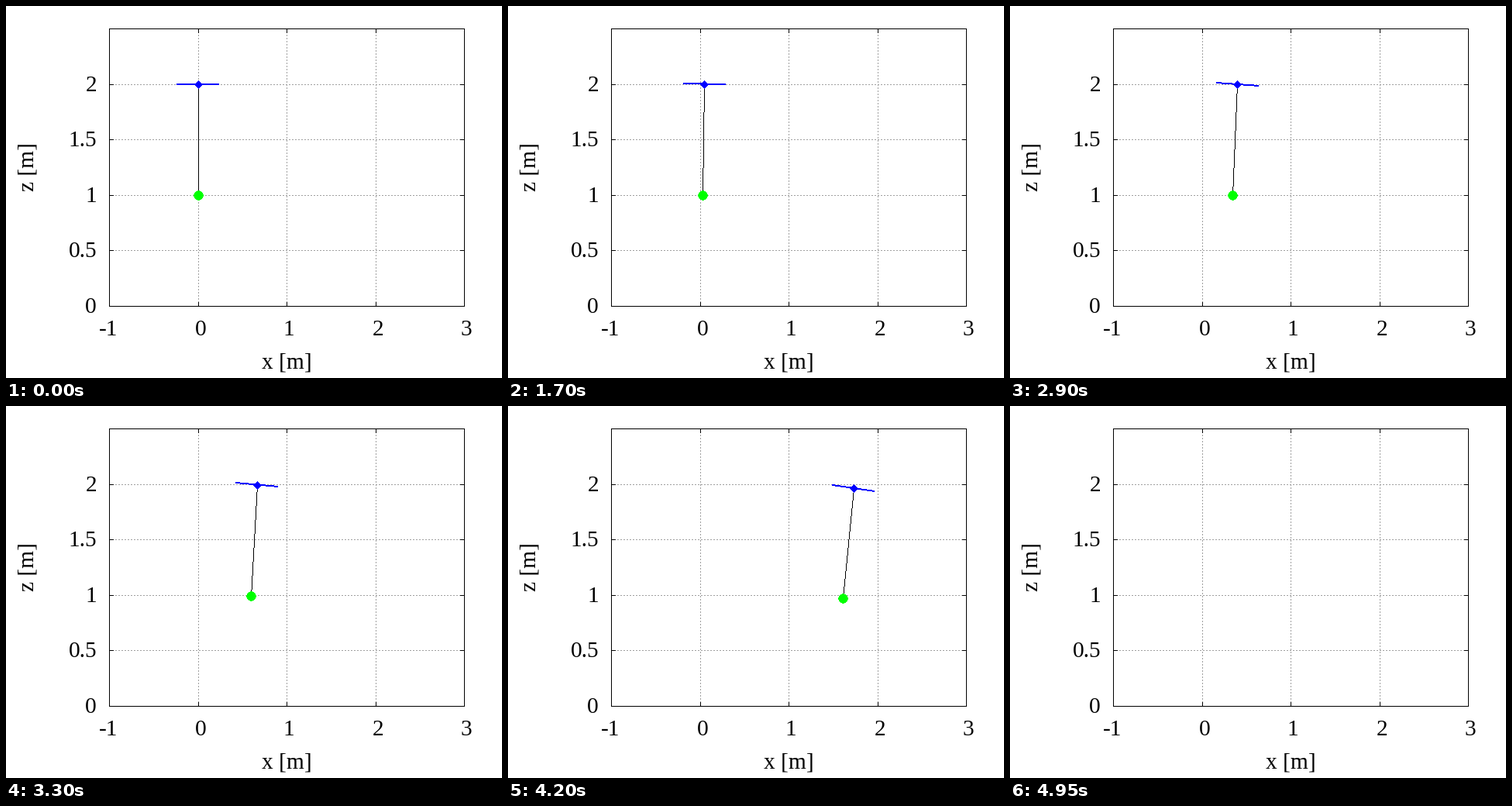
Recreate the animation shown at these times as a matplotlib script. Size 640 px wide and 480 px high, loop 7050 ms.

```python
import math

import matplotlib.pyplot as plt
from matplotlib.animation import FuncAnimation
from matplotlib.patches import Circle, Polygon, Rectangle

W, H, DPI = 640, 480, 100
PX = 72 / DPI                           # one pixel in points
LEFT, RIGHT, TOP, BOTTOM = 133, 591, 29, 387
STEP, FRAMES = 50, 141

G, ROPE = 9.81, 1.0
TILT = 0.00669                          # drone tilt is TILT * t^2
SHARE = 0.25                            # load's share of the total mass
SWING = math.sqrt(G / ((1 - SHARE) * ROPE))
FALL = 6.66e-6
ARM = 0.24
FONT_PX = 22 * 96 / 72

plt.rcParams["font.family"] = "Liberation Serif"
plt.rcParams["path.simplify"] = False
fig = plt.figure(figsize=(W / DPI, H / DPI), dpi=DPI, facecolor="white")
ax = fig.add_axes([0, 0, 1, 1])
ax.set(xlim=(0, W), ylim=(H, 0))
ax.axis("off")


def to_px(x, z):
    """Map metres to whole pixels."""
    col = math.floor(LEFT + 0.5 + (x + 1) * (RIGHT - LEFT) / 4)
    row = H - 1 - math.floor(H - 1 - BOTTOM + 0.5 + z * (BOTTOM - TOP) / 2.5)
    return col, row


def line(xs, ys, color="black", width=1, **kw):
    item, = ax.plot(xs, ys, color=color, lw=width * PX,
                    solid_capstyle="butt", dash_capstyle="butt", **kw)
    item.set_snap(False)
    return item


def stairs(u0, v0, u1, v1):
    """Pixel steps of a line that runs mainly along u, one per unit of u."""
    us, vs = [], []
    for u in range(u0, u1):
        v = math.floor(v0 + (v1 - v0) * (u - u0) / (u1 - u0) + 0.5)
        us += [u, u + 1, math.nan]
        vs += [v, v, math.nan]
    return us, vs


def label(x, y, text, **kw):
    ax.text(x, y, text, size=FONT_PX * PX, va="baseline", **kw)


def draw_axes():
    grid = dict(color="#a0a0a0", zorder=1, linestyle=(0, (2, 2)))
    for x in range(-1, 4):
        col = to_px(x, 0)[0] + 0.5
        if -1 < x < 3:
            line([col, col], [TOP, BOTTOM + 1], **grid)
            line([col, col], [BOTTOM, BOTTOM - 5], zorder=6)
            line([col, col], [TOP, TOP + 6], zorder=6)
        if x < 0:
            label(120, 425, str(x))
        else:
            label(col + 2.5, 425, str(x), ha="center")
    for i in range(5):
        row = to_px(0, i / 2)[1] + 0.5
        if i:
            line([LEFT, RIGHT + 1], [row, row], **grid)
            line([LEFT, LEFT + 6], [row, row], zorder=6)
            line([RIGHT - 5, RIGHT + 1], [row, row], zorder=6)
        label(117, row + 8.5, f"{i / 2:g}", ha="right")
    for row in (TOP, BOTTOM):
        line([LEFT, RIGHT + 1], [row + 0.5] * 2, zorder=6)
    for col in (LEFT, RIGHT):
        line([col + 0.5] * 2, [TOP, BOTTOM + 1], zorder=6)
    label(362, 467, "x [m]", ha="center")
    label(35, 208, "z [m]", ha="center", rotation=90, rotation_mode="anchor")


draw_axes()
frame_box = Rectangle((LEFT, TOP), RIGHT - LEFT, BOTTOM - TOP,
                      transform=ax.transData)
rope = line([], [], zorder=2)
bar = line([], [], "#0000ff", 2, zorder=3)
for item in (rope, bar):
    item.set_clip_path(frame_box)

# Aliased fills cover every pixel they touch, so the radii are a bit small.
HUB_R, LOAD_R = 4.7, 5.6
hub = Polygon([(0, 0)] * 4, facecolor="#0000ff", edgecolor="none",
              antialiased=False, zorder=4)
load = Circle((0, 0), LOAD_R, facecolor="#00ff00", edgecolor="none",
              antialiased=False, zorder=4)
for patch in (hub, load):
    patch.set_snap(False)
    ax.add_patch(patch)


def pose(t):
    """Drone position, load position and drone tilt at t seconds."""
    tilt = TILT * t**2
    swing = TILT * (t**2 - 2 / SWING**2 * (1 - math.cos(SWING * t)))
    center = G * (TILT * t**4 / 12 - TILT**3 * t**8 / 336)
    x = center + SHARE * ROPE * math.sin(swing)
    z = 2 - FALL * t**6 - SHARE * ROPE * (1 - math.cos(swing))
    end = (x - ROPE * math.sin(swing), z - ROPE * math.cos(swing))
    return (x, z), end, tilt


def draw(n):
    (x, z), end, tilt = pose(n * STEP / 1000)
    dx, dz = ARM * math.cos(tilt), ARM * math.sin(tilt)
    bar.set_data(*stairs(*to_px(x - dx, z + dz), *to_px(x + dx, z - dz)))

    hx, hy = to_px(x, z)
    lx, ly = to_px(*end)
    rows, cols = stairs(hy, hx, ly, lx)
    rope.set_data([c + 0.5 for c in cols], rows)

    hx, hy, r = hx + 0.5, hy + 0.5, HUB_R
    hub.set_xy([(hx - r, hy), (hx, hy - r), (hx + r, hy), (hx, hy + r)])
    load.center = (lx + 0.5, ly + 0.5)
    hub.set_visible(x <= 3)
    load.set_visible(end[0] <= 3)
    for item in (rope, bar):
        item.set_visible(x - dx <= 3)
    return rope, bar, hub, load


anim = FuncAnimation(fig, draw, frames=FRAMES, interval=STEP, repeat=True,
                     repeat_delay=0, init_func=lambda: draw(0))
plt.show()
```
